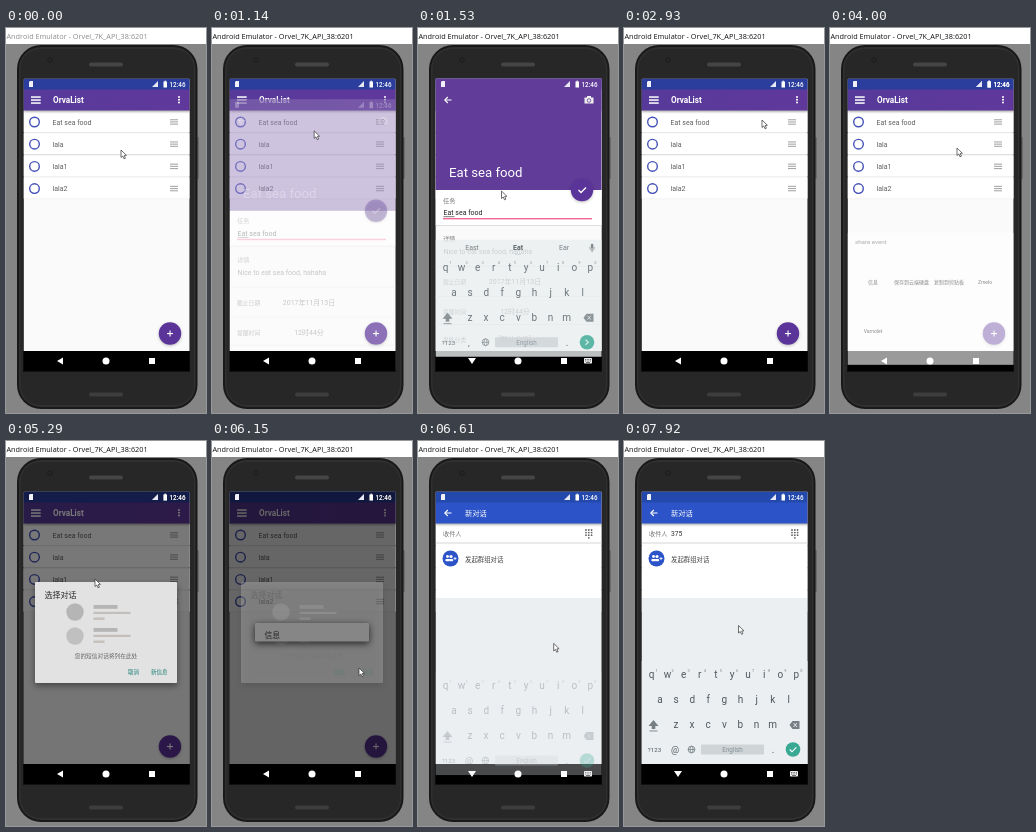
An HTML page with a canvas for the animation above (8000 ms loop, 200x385 px).

```html
<!DOCTYPE html>
<html lang="zh">
<head>
<meta charset="utf-8">
<title>Todo app demo</title>
<style>
html, body { margin: 0; width: 100%; height: 100%; overflow: hidden; background: #858585; }
canvas { display: block; width: 200px; height: 385px; }
</style>
</head>
<body>
<canvas id="stage"></canvas>
<script>
const W = 200, H = 385, LOOP = 8000;
// Phone display: left, width, top, and where the navigation bar starts
const SX = 17.5, SW = 166.2, SY = 50.5, NAV = 323;
const SANS = 'Roboto, "Noto Sans CJK SC", "Noto Sans CJK", sans-serif';
const canvas = document.getElementById('stage');
const ratio = window.devicePixelRatio || 1;
canvas.width = W * ratio;
canvas.height = H * ratio;
const c = canvas.getContext('2d');

const clamp = v => Math.max(0, Math.min(1, v));
const ramp = (t, a, b) => clamp((t - a) / (b - a));
const ease = (t, a, b) => { const k = ramp(t, a, b); return k * k * (3 - 2 * k); };

function rect(x, y, w, h, color) { c.fillStyle = color; c.fillRect(x, y, w, h); }

// Full-width band of the display
function band(y, bottom, color) { rect(SX, y, SW, bottom - y, color); }

function round(x, y, w, h, r, color) {
  c.beginPath();
  c.roundRect(x, y, w, h, r);
  c.fillStyle = color;
  c.fill();
}

function disc(x, y, r, color) {
  c.beginPath();
  c.arc(x, y, r, 0, 7);
  c.fillStyle = color;
  c.fill();
}

function ring(x, y, r, color, width) {
  c.beginPath();
  c.arc(x, y, r, 0, 7);
  c.strokeStyle = color;
  c.lineWidth = width;
  c.stroke();
}

function line(points, color, width) {
  c.beginPath();
  points.forEach(([x, y]) => c.lineTo(x, y));
  c.strokeStyle = color;
  c.lineWidth = width;
  c.stroke();
}

function poly(points, color) {
  c.beginPath();
  points.forEach(([x, y]) => c.lineTo(x, y));
  c.closePath();
  c.fillStyle = color;
  c.fill();
}

function text(s, x, y, size, color, align = 'left', weight = 400, family = SANS) {
  c.font = `${weight} ${size}px ${family}`;
  c.textAlign = align;
  c.fillStyle = color;
  c.fillText(s, x, y);
}

// Draw a group with its own opacity and vertical shift.
function layer(alpha, dy, draw) {
  if (alpha <= 0) return;
  c.save();
  c.globalAlpha *= alpha;
  c.translate(0, dy);
  draw();
  c.restore();
}

function clipped(bottom, draw) {
  c.save();
  c.beginPath();
  c.rect(SX, SY, SW, bottom - SY);
  c.clip();
  draw();
  c.restore();
}

function shadow(blur, dy, color, draw) {
  c.save();
  c.shadowBlur = blur * ratio;
  c.shadowOffsetY = dy * ratio;
  c.shadowColor = color;
  draw();
  c.restore();
}

function phone(t) {
  rect(0, 0, W, H, '#858585');
  rect(0, 0, W, 16, '#fff');
  text('Android Emulator - Orvel_7K_API_38:6201', 0.5, 11, 7.3, t < 80 ? '#8c8c8c' : '#111',
    'left', 400, '"Open Sans", "Noto Sans", sans-serif');
  round(190, 109, 2.8, 42, 1, '#666');
  round(11, 17, 180.5, 364, 24, '#191919');
  round(13, 19, 176.5, 360, 22, '#303030');
  round(14.5, 21, 173.5, 356, 20, '#272727');
  ring(44, 32, 2.2, '#1b1b1b', 1);
  round(83, 34.5, 34, 4, 2, '#454545');
  round(83, 364.5, 34, 4, 2, '#3d3d3d');
  rect(17, 50, 167, 294, '#111');
}

function statusIcons() {
  poly([[23, 54], [24, 53], [27, 53], [27, 59], [23, 59]], '#f0f1f8');
  poly([[146, 59], [152, 53], [152, 59]], '#e6e8f4');
  rect(157.5, 53.5, 3.5, 6, '#fff');
  rect(158.5, 52.7, 1.5, 1, '#fff');
  text('12:46', 179.5, 59, 6.3, '#fff', 'right', 500);
}

function status(color) {
  band(SY, 61.5, color);
  statusIcons();
}

function navBar(keyboard) {
  band(NAV, 343, '#000');
  poly(keyboard ? [[50, 330], [58, 330], [54, 336]] : [[51, 333], [57, 329.5], [57, 336.5]], '#fff');
  disc(100, 333, 3.5, '#fff');
  rect(143, 330, 6, 6, '#fff');
  if (keyboard) {
    round(166, 330, 8, 5.5, 0.7, '#eee');
    for (let i = 0; i < 8; i++) rect(167 + (i % 4) * 1.7, 331 + (i >> 2) * 1.6, 0.8, 0.8, '#222');
    rect(168, 334.2, 4, 0.6, '#222');
  }
}

function backArrow() {
  line([[33.5, 72], [27, 72]], '#fff', 1.1);
  line([[29.8, 69], [26.8, 72], [29.8, 75]], '#fff', 1.1);
}

function fab(x, y) {
  shadow(3, 1, 'rgba(0,0,0,.25)', () => disc(x, y, 11.2, '#5b349a'));
}

function row(label, i, dx) {
  const y = 83 + i * 22.2;
  c.save();
  c.translate(dx, 0);
  shadow(1.5, 0.8, 'rgba(0,0,0,.22)', () => band(y, y + 21, '#fff'));
  ring(28.5, y + 11, 4.8, '#4351b8', 1.4);
  text(label, 46.5, y + 13.6, 7, '#5f5f5f');
  for (let k = 0; k < 3; k++) rect(164, y + 8.2 + k * 2.2, 8, 1.1, '#a9a9a9');
  c.restore();
}

function listScreen(t) {
  band(SY, NAV, '#fafafa');
  const swipe = ease(t, 3080, 3420) * (1 - ease(t, 3700, 3860));
  ['Eat sea food', 'lala', 'lala1', 'lala2'].forEach((s, i) => row(s, i, i ? 0 : -58 * swipe));
  const g = c.createLinearGradient(SX, 0, SX + SW, 0);
  g.addColorStop(0, '#563a9a');
  g.addColorStop(1, '#60389c');
  shadow(2, 1, 'rgba(0,0,0,.3)', () => band(61, 82.5, g));
  status('#2b3d9d');
  for (let k = 0; k < 3; k++) {
    rect(25, 68.3 + k * 3, 9.7, 1.5, '#fff');
    disc(173, 69 + k * 2.8, 1, '#fff');
  }
  text('OrvaList', 47, 75, 8.2, '#fff', 'left', 700);
  fab(164, 305.5);
  rect(161, 305, 6, 1.1, '#fff');
  rect(163.5, 302.5, 1.1, 6, '#fff');
}

function keyboard(top, at, enter) {
  band(top, NAV, '#eceff1');
  const ink = '#4e585e';
  [['qwertyuiop', 27.5, 237], ['asdfghjkl', 36, 262], ['zxcvbnm', 52, 287]].forEach(([keys, x, y], r) => {
    [...keys].forEach((k, i) => {
      text(k, x + i * 16.1, y, 10, ink, 'center');
      if (!r) text((i + 1) % 10, x + 5 + i * 16.1, y - 6.5, 4, '#7d878c', 'center');
    });
  });
  poly([[24.5, 285], [29.5, 279], [34.5, 285]], '#757f84');
  rect(27.7, 284.5, 3.6, 3.5, '#757f84');
  rect(25.5, 289.5, 8, 0.9, '#757f84');
  poly([[165.5, 284], [168.5, 280], [175.5, 280], [175.5, 288], [168.5, 288]], '#757f84');
  line([[169.5, 282], [173, 286]], '#fff', 0.8);
  line([[173, 282], [169.5, 286]], '#fff', 0.8);
  text('?123', 30.5, 311, 6.2, ink, 'center');
  text(at, 51, 312, 9, ink, 'center');
  ring(67.5, 308.5, 3.4, '#68737a', 0.7);
  c.beginPath();
  c.ellipse(67.5, 308.5, 1.5, 3.4, 0, 0, 7);
  c.stroke();
  line([[64, 308.5], [71, 308.5]], '#68737a', 0.7);
  round(77, 303.5, 63, 10, 1, '#cfd4d7');
  text('English', 108.5, 311, 6.3, '#859096', 'center');
  text('.', 149, 312, 10, ink, 'center');
  disc(169, 308.5, 7.3, '#3aa994');
  line(enter, '#fff', 1.1);
}

function detailScreen(t) {
  band(SY, NAV, '#fafafa');
  band(162, 197, '#fff');
  text('任务', 25, 174.5, 6.2, '#777');
  text('Eat sea food', 25.5, 187.3, 7, '#222');
  rect(25.5, 188.5, 11, 0.6, '#222');
  rect(25, 190, 149, 1.4, '#f06a98');
  band(197, 198, '#ddd');
  text('详情', 25, 213, 6.2, '#777');
  text('Nice to eat sea food, hahaha', 25.5, 226, 7, '#555');
  [['截止日期', '2017年11月13日', 256], ['提醒时间', '12时44分', 286], ['事件分类', '[默认分类]', 314]].forEach(([a, b, y]) => {
    band(y - 18, y - 17.2, '#ddd');
    text(a, 25, y, 5.8, '#666');
    text(b, 97, y, 7, '#555', 'center');
  });
  band(SY, 162, '#613c98');
  status('#613c98');
  backArrow();
  rect(166.5, 69.5, 9, 6, '#eee');
  rect(169, 68, 4, 2, '#eee');
  ring(171, 72.5, 1.8, '#613c98', 0.8);
  text('Eat sea food', 31, 149.3, 13.2, '#fff');
  fab(164, 162);
  line([[160.5, 162], [163, 164.5], [168, 159.5]], '#fff', 1.3);
}

function detailKeyboard() {
  keyboard(206, ',', [[167.5, 305.8], [170.3, 308.5], [167.5, 311.2]]);
  text('East', 54, 216.5, 7, '#5a646a', 'center');
  text('Eat', 100, 216.5, 7, '#38424a', 'center', 700);
  text('Ear', 146, 216.5, 7, '#5a646a', 'center');
  for (let i = 0; i < 3; i++) disc(98 + i * 2, 220.5, 0.5, '#8a9499');
  round(172.8, 210, 2.6, 5, 1.3, '#69747a');
  line([[171.5, 213.5], [172.5, 216], [175.7, 216], [176.7, 213.5]], '#69747a', 0.7);
  line([[174.1, 216], [174.1, 218.5]], '#69747a', 0.8);
}

function sheet() {
  band(191, NAV, '#fff');
  text('share event', 25, 202, 6.2, '#777');
  [['信息', 43, 242.5], ['保存到云端硬盘', 81.5, 242.5], ['复制到剪贴板', 119, 242.5], ['Zmelo', 155, 242.5], ['Varnolet', 43, 291.5]]
    .forEach(([s, x, y]) => text(s, x, y, 5, '#444', 'center'));
}

function chooser() {
  shadow(6, 3, 'rgba(0,0,0,.4)', () => round(29, 141, 142, 101, 1, '#e2e2e2'));
  text('选择对话', 38.5, 157, 8, '#2a2a2a');
  disc(69, 171, 8.7, '#b5b5b5');
  disc(69, 195, 8.7, '#c0c0c0');
  [164, 187].forEach(y => {
    rect(87.5, y, 24, 3.8, '#b5b5b5');
    rect(87.5, y + 6.8, 37, 2.2, '#c2bebc');
    rect(87.5, y + 12.5, 11, 2.4, '#c6bfba');
  });
  text('您的短信对话将列在此处', 100, 217, 5.7, '#666', 'center');
  text('取消', 122, 233, 5.5, '#177c70', 'left', 500);
  text('新信息', 145, 233, 5.5, '#177c70', 'left', 500);
}

function messageBox() {
  shadow(7, 2, 'rgba(0,0,0,.7)', () => round(43, 182, 114, 18.5, 1, '#868686'));
  text('信息', 52.5, 197, 7.8, '#222');
}

function composeScreen(t) {
  band(SY, 157, '#fff');
  band(157, NAV, '#eceff1');
  shadow(2, 1, 'rgba(0,0,0,.3)', () => band(61, 82.5, '#2c54c8'));
  status('#2449ad');
  backArrow();
  text('新对话', 47, 75, 7.3, '#fff', 'left', 500);
  text('收件人', 25, 94.5, 6.2, '#777');
  const typed = [7150, 7610, 7920].filter(k => t >= k).length;
  text('375'.slice(0, typed), 47, 95, 6.7, '#333');
  for (let i = 0; i < 9; i++) disc(168 + (i % 3) * 2.8, 89 + Math.floor(i / 3) * 2.6, 0.9, '#666');
  disc(170.8, 96.8, 0.9, '#666');
  band(101.5, 102.5, '#d5d5d5');
  disc(32.5, 117.5, 8, '#2c54c8');
  [[29.5, 1.4], [33, 1.6]].forEach(([x, r]) => {
    disc(x, 115.5, r, '#fff');
    round(x - 2.2, 118, 4.4, 2.3, 1, '#fff');
  });
  line([[35.5, 117.5], [38.5, 117.5]], '#fff', 0.8);
  line([[37, 116], [37, 119]], '#fff', 0.8);
  text('发起群组对话', 47, 120.5, 6.4, '#444');
}

// Pointer stops: time, x, y
const stops = [
  [80, 115, 122], [830, 106, 97], [910, 104, 97], [1060, 104, 97], [1500, 83.5, 163], [1560, 83.5, 163],
  [1830, 70, 150], [2200, 30, 72], [2400, 30, 72], [2680, 131, 99], [2930, 138, 92], [3080, 138, 92],
  [3420, 80, 95], [3500, 80, 95], [3750, 130, 98], [3850, 130, 100], [4000, 127, 120], [4100, 120, 135],
  [4650, 45, 228], [4990, 45, 228], [5250, 89, 138], [5400, 89, 138], [5750, 86, 157], [5910, 147, 227],
  [6250, 147, 227], [6840, 130, 190], [6920, 130, 190], [7230, 114.5, 184.5]
];

function pointer(t) {
  let i = stops.findIndex(s => s[0] > t);
  if (i < 0) i = stops.length;
  const a = stops[Math.max(0, i - 1)], b = stops[Math.min(stops.length - 1, i)];
  const k = a === b ? 0 : ease(t, a[0], b[0]);
  c.save();
  c.translate(a[1] + (b[1] - a[1]) * k, a[2] + (b[2] - a[2]) * k);
  const shape = [[0, 0], [0, 7.5], [1.8, 6], [3, 8.8], [4.4, 8.2], [3.2, 5.5], [5.4, 5.3]];
  poly(shape, '#fff');
  line([...shape, shape[0]], '#333', 0.7);
  c.restore();
}

function display(t) {
  listScreen(t);
  const detail = ease(t, 1060, 1280) * (1 - ease(t, 2380, 2600));
  layer(detail, (1 - detail) * 30, () => detailScreen(t));
  navBar((t >= 1450 && t < 2050) || t >= 6600);

  // Keyboard and share sheet slide up over the navigation bar while they fade in.
  const keys = ease(t, 1400, 1620) * (1 - ease(t, 1950, 2120));
  layer(Math.min(1, keys * 1.25), (1 - keys) * 16, detailKeyboard);

  const compose = ease(t, 6240, 6440), box = ease(t, 6070, 6145);
  const dim = 0.53 * ease(t, 4000, 4260) + 0.07 * box;
  if (dim > 0) {
    band(SY, NAV, `rgba(0,0,0,${dim})`);
    statusIcons();
  }

  const up = ramp(t, 3900, 4067) * (1 - ease(t, 4990, 5150));
  layer(up, (1 - up) * 35, sheet);

  layer(ease(t, 5110, 5270) * (1 - 0.75 * ease(t, 6060, 6150)) * (1 - ramp(t, 6160, 6240)), 0, chooser);
  layer(box * (1 - ramp(t, 6220, 6300)), 0, messageBox);
  clipped(NAV, () => layer(compose, (1 - compose) * 30, () => composeScreen(t)));
  const typing = ease(t, 6500, 6800);
  layer(typing, (1 - typing) * 16, () => keyboard(220, '@', [[165.8, 308.5], [168, 310.8], [172.3, 306.3]]));
}

function draw(t) {
  c.setTransform(ratio, 0, 0, ratio, 0, 0);
  phone(t);
  clipped(343, () => display(t));
  pointer(t);
}

const start = performance.now();
function tick() {
  draw((performance.now() - start) % LOOP);
  requestAnimationFrame(tick);
}
tick();
</script>
</body>
</html>
```
